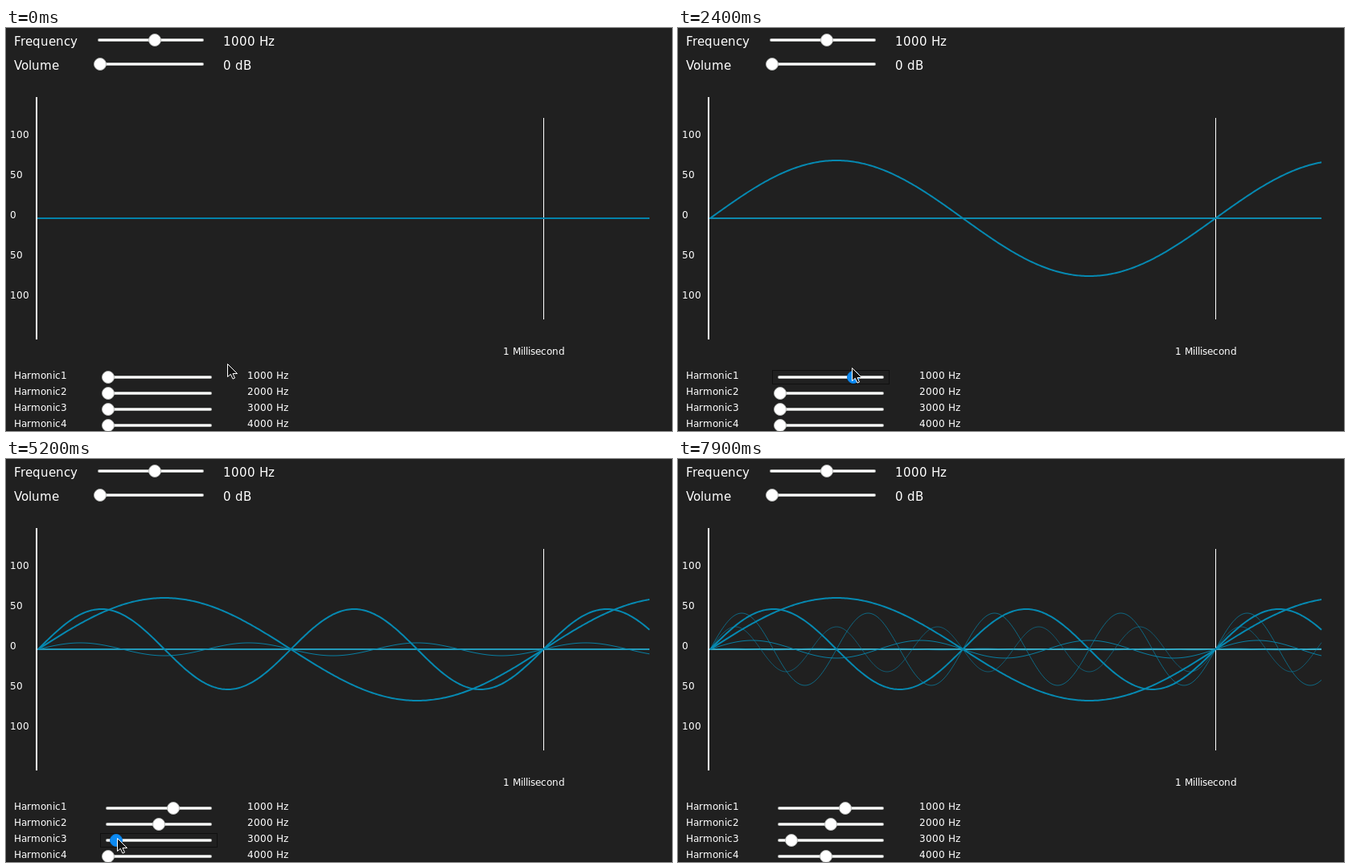
These frames come from a looping animation (828x502 px, 8000 ms). An HTML page with a canvas:

```html
<!DOCTYPE html>
<html lang="en">
<head>
<meta charset="utf-8">
<title>Harmonics</title>
<style>
html, body { margin: 0; width: 100%; height: 100%; overflow: hidden; background: #202020; }
canvas { display: block; }
</style>
</head>
<body>
<canvas id="stage" width="828" height="502"></canvas>
<script>
const ctx = document.getElementById('stage').getContext('2d');
const LOOP = 8000, TICK = 100;
const LEFT = 40, RIGHT = 800, ZERO = 237;
const LEAD = 110;      // the pointer runs this far ahead of the knob
const LEAVE = 6400;    // the pointer leaves the stage

// One drag per harmonic: the pointer arrives at `grab`, the level rises to
// `peak` during from..top, then may settle to another level.
// `dy` is the pointer's height relative to the slider.
const drags = [
  { grab: 1800, from: 1800, top: 2400, peak: 72, dy: -12, settle: { from: 2890, top: 3010, level: 64 } },
  { grab: 3000, from: 3345, top: 3600, peak: 60, dy: -2, settle: { from: 3900, top: 4300, level: 50 } },
  { grab: 4700, from: 4800, top: 5400, peak: 11, dy: -3 },
  { grab: 5700, from: 5790, top: 6400, peak: 45, dy: -7 },
  { from: 7000, top: 7150, peak: 28 },
  { from: 7800, top: 7900, peak: 1 }
];

// Pointer stops before the first drag.
const wander = [
  { t: 0, x: 275, y: 418 }, { t: 400, x: 446, y: 53 }, { t: 900, x: 189, y: 431 },
  { t: 1200, x: 126, y: 469 }, { t: 1700, x: 153, y: 429 }, { t: 1800, x: 131, y: 432 }
];

const sliderY = i => 435 + i * 20;
const knobX = level => Math.round(127 + level * 1.26);
const mix = (a, b, u) => a + (b - a) * u;

function ease(t, from, top) {
  const u = Math.min(1, Math.max(0, (t - from) / (top - from)));
  return u * u * (3 - 2 * u);
}

function levelAt({ from, top, peak, settle }, t) {
  let level = peak * ease(t, from, top);
  if (settle) level = mix(level, settle.level, ease(t, settle.from, settle.top));
  return Math.round(level);
}

function pointerAt(t) {
  const i = drags.findLastIndex(d => d.grab <= t);
  if (i >= 0) {
    return { x: knobX(levelAt(drags[i], t + LEAD)) - 2, y: sliderY(i) + drags[i].dy };
  }
  const next = wander.findIndex(p => p.t > t);
  const a = wander[next - 1], b = wander[next];
  const u = (t - a.t) / (b.t - a.t);
  return { x: Math.round(mix(a.x, b.x, u)), y: Math.round(mix(a.y, b.y, u)) };
}

function rect(color, x, y, w, h) {
  ctx.fillStyle = color;
  ctx.fillRect(x, y, w, h);
}

function pill(color, x, y, w, h) {
  ctx.beginPath();
  ctx.roundRect(x, y, w, h, h / 2);
  ctx.fillStyle = color;
  ctx.fill();
}

// Text with advances and kerning rounded to whole pixels, like a hinted font.
function label(str, x, y, size = 12) {
  ctx.font = size + 'px "DejaVu Sans", sans-serif';
  ctx.fillStyle = '#fff';
  const width = s => ctx.measureText(s).width;
  [...str].forEach((ch, i) => {
    if (i > 0) {
      const prev = str[i - 1];
      x += Math.round(width(prev)) + Math.round(width(prev + ch) - width(prev) - width(ch));
    }
    ctx.fillText(ch, x, y);
  });
}

function slider(x, y, knob, lit, focused) {
  if (focused) {
    ctx.strokeStyle = '#000';
    ctx.lineWidth = 1;
    ctx.setLineDash([1, 1]);
    ctx.strokeRect(x - 6.5, y - 8.5, 145, 17);
    ctx.setLineDash([]);
  }
  pill('#b8bab8', x, y - 2, 132, 4);
  pill('#fff', x + 1, y - 1, 130, 2);
  ctx.beginPath();
  ctx.arc(knob, y, 7.5, 0, Math.PI * 2);
  ctx.fillStyle = lit ? '#0c8af2' : '#fff';
  ctx.fill();
  ctx.strokeStyle = lit ? '#0a7fe0' : '#b8bab8';
  ctx.lineWidth = 1;
  ctx.stroke();
}

function wave(level, n) {
  ctx.beginPath();
  for (let x = LEFT; x <= RIGHT; x += 2) {
    ctx.lineTo(x, ZERO - level * Math.sin((x - LEFT) / 100 * n));
  }
  ctx.strokeStyle = '#0689b1';
  ctx.lineWidth = n < 3 ? 2 : Math.max(0.5, 2.7 / n);
  ctx.stroke();
}

// The zero line grows lighter with each harmonic raised off it.
function baseline(raised) {
  const [r, g, b] = [[3, 66], [130, 174], [170, 196]].map(([lo, hi]) => mix(lo, hi, raised / 6));
  rect(`rgb(${r},${g},${b})`, LEFT - 1, ZERO - 1, RIGHT - LEFT + 1, 2);
}

function arrow({ x, y }) {
  ctx.save();
  ctx.translate(x + 0.5, y + 0.5);
  ctx.beginPath();
  ctx.moveTo(0, 0);
  for (const [px, py] of [[0, 16], [3.8, 12.8], [6.5, 18.6], [9, 17.5], [6.5, 12], [12, 12]]) {
    ctx.lineTo(px, py);
  }
  ctx.closePath();
  ctx.fillStyle = '#111';
  ctx.fill();
  ctx.strokeStyle = '#fff';
  ctx.lineWidth = 1;
  ctx.stroke();
  ctx.restore();
}

function draw(t) {
  rect('#202020', 0, 0, 828, 502);
  rect('#1a1a1a', 0, 501, 828, 1);

  label('Frequency', 10, 22, 15);
  label('1000 Hz', 270, 22, 15);
  slider(114, 15, 185);
  label('Volume', 10, 52, 15);
  label('0 dB', 270, 52, 15);
  slider(114, 45, 117);

  rect('#fff', 37, 86, 2, 302);
  rect('#fff', 668, 112, 1, 251);
  for (let i = -2; i <= 2; i++) label(String(Math.abs(i) * 50), 5, ZERO + i * 50);
  label('1 Millisecond', 618, 407);

  const levels = drags.map(d => levelAt(d, t));
  baseline(levels.filter(v => v > 0).length);
  levels.forEach((v, i) => { if (v > 0) wave(v, i + 1); });

  const focused = drags.findLastIndex(d => d.from <= t);
  const held = t < LEAVE ? drags.findLastIndex(d => d.grab <= t) : -1;
  for (let i = 0; i < 4; i++) {
    const y = sliderY(i), focus = i === focused;
    label('Harmonic' + (i + 1), 10, y + 2);
    label((i + 1) * 1000 + ' Hz', 300, y + 2);
    slider(124, y, knobX(levels[i]), focus && i === held, focus);
  }

  if (t < LEAVE) arrow(pointerAt(t));
}

let start;
function frame(time) {
  start ??= time;
  const t = (time - start) % LOOP;
  draw(Math.floor(t / TICK) * TICK);
  requestAnimationFrame(frame);
}
draw(0);
requestAnimationFrame(frame);
</script>
</body>
</html>
```
